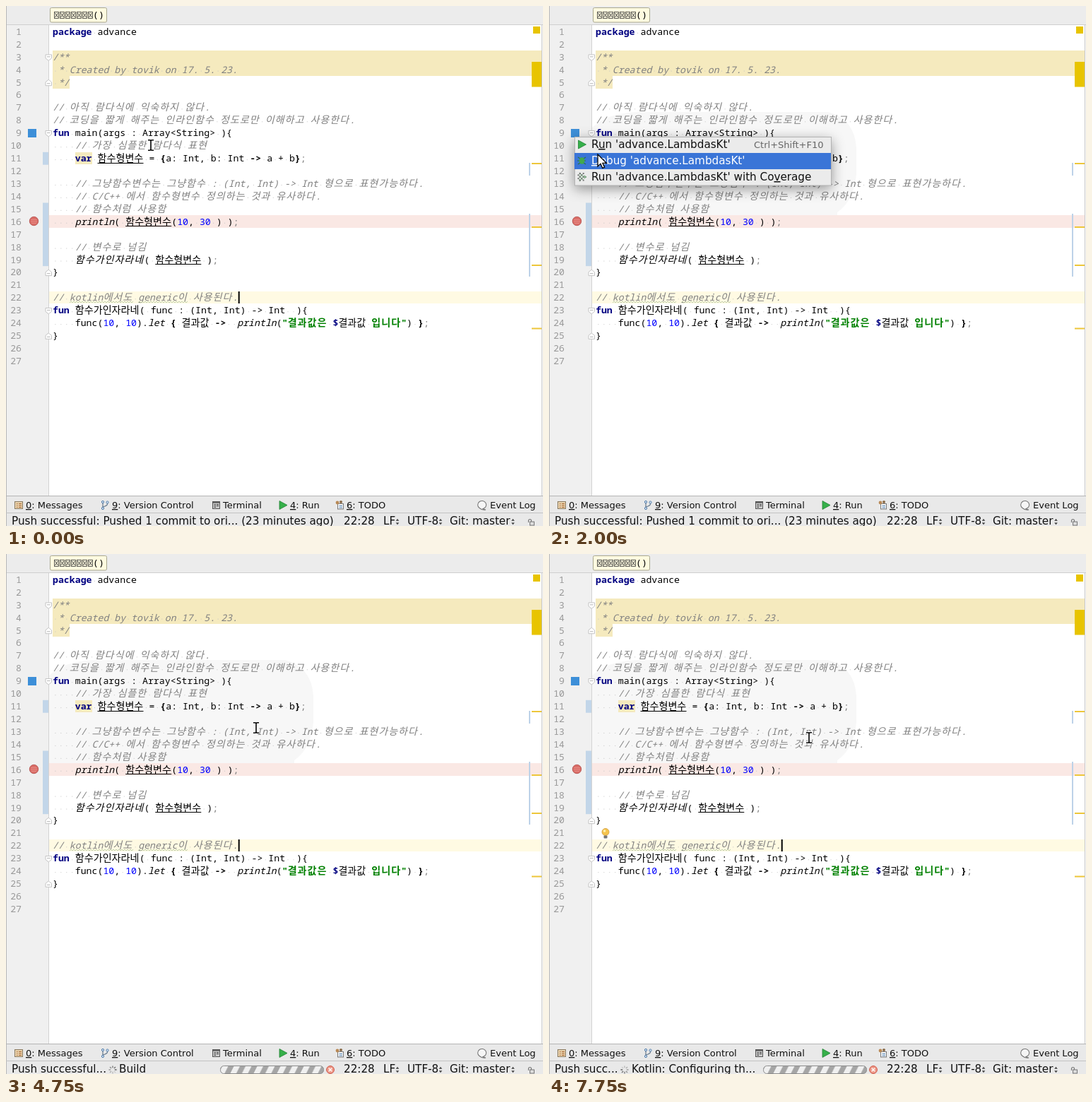
These frames come from a looping animation (760x736 px, 8 s). An HTML page:

```html
<!DOCTYPE html>
<html lang="ko">
<head>
<meta charset="utf-8">
<title>Editor</title>
<style>
html, body { margin: 0; width: 100%; height: 100%; overflow: hidden; background: #fff; }
svg { display: block; width: 760px; height: 736px; }
text { white-space: pre; }
.ui { font-family: "DejaVu Sans", sans-serif; font-size: 13px; fill: #111; }
.big { font-size: 15.2px; }
.mono { font-family: "Noto Sans Mono", monospace; font-size: 13.23px; fill: #000; }
.ko { font-family: "Noto Sans CJK KR", "Noto Sans CJK", sans-serif; font-size: 14.1px; }
.k, .b, .s { font-weight: bold; }
.k { fill: #000080; }
.s { fill: #008000; }
.n { fill: #0000ff; }
.c, .i { font-style: italic; }
.c, .g { fill: #808080; }
.ko.c, .ko.i, .ko.s { letter-spacing: .95px; }
.num { fill: #999; text-anchor: end; }
.key { text-decoration: underline; }
</style>
</head>
<body>
<svg id="stage" viewBox="0 0 760 736">
  <defs>
    <pattern id="stripes" width="16.5" height="12" patternUnits="userSpaceOnUse" y="724">
      <rect width="16.5" height="12" fill="#f0f0f0"/>
      <path d="M-10 12 L-4 0 H4 L-2 12Z M6.5 12 L12.5 0 H20.5 L14.5 12Z" fill="#a5a5a5"/>
    </pattern>
    <filter id="shadow" filterUnits="userSpaceOnUse" x="0" y="145" width="450" height="165">
      <feDropShadow dx="0" dy="5" stdDeviation="9" flood-opacity=".4"/>
    </filter>
  </defs>
</svg>
<script>
const NS = 'http://www.w3.org/2000/svg';
const stage = document.getElementById('stage');
const CELL = 7.938, ROW = 17.93, TOP = 27.5, LEFT = 66, RIGHT = 758;

function el(name, attrs = {}, parent = stage) {
  const node = document.createElementNS(NS, name);
  for (const a in attrs) node.setAttribute(a, attrs[a]);
  parent.appendChild(node);
  return node;
}
const group = (parent = stage) => el('g', {}, parent);
const rect = (x, y, width, height, fill, parent, more) =>
  el('rect', { x, y, width, height, fill, ...more }, parent);
const path = (d, fill, parent, more) => el('path', { d, fill, ...more }, parent);
const line = (d, stroke, width, parent) =>
  path(d, 'none', parent, { stroke, 'stroke-width': width });
const circle = (cx, cy, r, fill, parent, more) =>
  el('circle', { cx, cy, r, fill, ...more }, parent);
const rowTop = n => TOP + (n - 1) * ROW;
const baseline = n => rowTop(n) + 13.3;

// An underscore underlines the letter after it.
function label(x, y, str, cls, parent) {
  const node = el('text', { x, y, class: cls }, parent);
  const [head, tail] = str.split('_');
  node.append(head);
  if (tail) {
    el('tspan', { class: 'key' }, node).textContent = tail[0];
    node.append(tail.slice(1));
  }
  return node;
}

// Editor surfaces
rect(0, 0, 760, 736, '#fff');
rect(0, 0, 760, 26, '#ececec');
rect(0, 27, 60, 666, '#f0f0f0');
rect(0, 26, 760, 1, '#cfcfcf');
const halo = path('M61 172Q85 150 130 150H395Q432 160 435 200V238Q432 275 408 292V296H61Z', '#f7f7f7');
rect(LEFT, 63, RIGHT - LEFT, 36, '#f5eabe');
rect(LEFT, 99, 24, 18, '#f5eabe');
rect(98, 207, 24, 17, '#f5eabe');
rect(61, 296, RIGHT - 61, 18, '#fae8e4');
rect(61, 404, RIGHT - 61, 17, '#fffae3');
rect(60, 27, 1, 666, '#d3d3d3');
rect(0, 0, 1, 736, '#b8b8b8');
rect(RIGHT, 27, 1, 666, '#c4c4c4');

// Breadcrumb
rect(62.5, 2.5, 80, 20.5, '#fffbe0', stage, { stroke: '#a9a78f', rx: 2 });
for (let i = 0; i < 7; i++) {
  const x = 68.5 + i * 8;
  rect(x, 8.5, 6, 9, 'none', stage, { stroke: '#333', 'stroke-width': .8 });
  line(`M${x + 1} 10l4 6m0-6l-4 6`, '#444', 1);
}
label(123, 17, '()', 'mono');

// Change marks and stripe
for (const [a, b] of [[11, 12], [15, 20]])
  rect(52, rowTop(a), 8, rowTop(b) - rowTop(a), '#c2d6e9');
rect(740, 222, 2, 18, '#bdd2e8');
rect(740, 294, 2, 89, '#bdd2e8');
rect(746, 29, 10, 10, '#e8c400');
rect(744, 79, 14, 35.5, '#e8c400');
for (const y of [222, 312, 366, 455.5]) rect(744, y, 14, 2, '#edc63a');

// Code: style and text in turn
const code = [
  ['k', 'package', '', ' advance'],
  [],
  ['c', '/**'],
  ['c', ' * Created by tovik on 17. 5. 23.'],
  ['c', ' */'],
  [],
  ['c', '// 아직 람다식에 익숙하지 않다.'],
  ['c', '// 코딩을 짧게 해주는 인라인함수 정도로만 이해하고 사용한다.'],
  ['k', 'fun', '', ' main(args : Array<String> ){'],
  ['c', '    // 가장 심플한 람다식 표현'],
  ['k', '    var', '', ' ', 'u', '함수형변수', '', ' = ', 'b', '{', '', 'a: Int, b: Int ',
    'b', '->', '', ' a + b', 'b', '}', 'g', ';'],
  [],
  ['c', '    // 그냥함수변수는 그냥함수 : (Int, Int) -> Int 형으로 표현가능하다.'],
  ['c', '    // C/C++ 에서 함수형변수 정의하는 것과 유사하다.'],
  ['c', '    // 함수처럼 사용함'],
  ['i', '    println', '', '( ', 'u', '함수형변수', '', '(', 'n', '10', '', ', ', 'n', '30',
    '', ' ) )', 'g', ';'],
  [],
  ['c', '    // 변수로 넘김'],
  ['i', '    함수가인자라네', '', '( ', 'u', '함수형변수', '', ' )', 'g', ';'],
  ['', '}'],
  [],
  ['c', '// kotlin에서도 generic이 사용된다.'],
  ['k', 'fun', '', ' 함수가인자라네( func : (Int, Int) -> Int  ){'],
  ['', '    func(', 'n', '10', '', ', ', 'n', '10', '', ').', 'i', 'let', 'b', ' {', '', ' 결과값 ',
    'b', '->', 'i', '  println', '', '(', 's', '"결과값은 ', 'k', '$', '', '결과값', 's', ' 입니다"',
    '', ') ', 'b', '}', 'g', ';'],
  ['', '}'],
  [],
  []
];

function drawRun(x, y, style, str) {
  for (const part of str.match(/[가-힣]+|\s|[^가-힣\s]+/g)) {
    if (part === ' ') {
      rect(x + 3.4, y - 3, 1, 1, '#c4c4c4');
      x += CELL;
      continue;
    }
    const korean = /[가-힣]/.test(part);
    label(x, y, part, `mono ${korean ? 'ko ' : ''}${style}`);
    const width = part.length * (!korean ? CELL : 'cis'.includes(style || '-') ? 13.95 : 13);
    if (style === 'u') rect(x, Math.round(y + 1.5), width, 1, '#000');
    x += width;
  }
  return x;
}

code.forEach((runs, i) => {
  const y = baseline(i + 1);
  label(22, y, String(i + 1), 'mono num');
  let x = LEFT;
  for (let r = 0; r < runs.length; r += 2) x = drawRun(x, y, runs[r], runs[r + 1]);
});

function wave(from, to, y) {
  let d = `M${from} ${y}`;
  for (let x = from, up = true; x < to; x += 2, up = !up) d += `l2 ${up ? -2 : 2}`;
  line(d, '#b9c9a6', .9);
}
wave(90, 180, 420);
wave(187, 257, 420);

// Gutter marks
for (const [n, dir] of [[3, 1], [9, 1], [23, 1], [5, -1], [20, -1], [25, -1]]) {
  const y = rowTop(n) + 9.5;
  path(`M56 ${y - 4 * dir}h8.5v${5 * dir}l-4.25 ${3.5 * dir}l-4.25 ${-3.5 * dir}z`, '#fff', stage, { stroke: '#c4c4c4' });
  line(`M58 ${y - dir}h4.5`, '#b5b5b5', 1);
}
rect(31, 174, 12, 12, '#3d8fd8');
circle(39.5, 304.5, 6.2, '#db6e68', stage, { stroke: '#b4504c', 'stroke-width': .9 });
line('M35.5 302.5h8M35 305h9M36 307.5h7', '#e89a94', .7);

const bulb = group();
circle(80, 393.5, 5, '#f5c44e', bulb, { stroke: '#cf9836', 'stroke-width': .8 });
circle(78.6, 392, 1.8, '#fff0b0', bulb);
rect(77.5, 398.5, 5, 4, '#777', bulb, { rx: 1 });
const caret = rect(328.7, 404, 2, 17, '#000');

// Tool window bar
rect(1, 693, 759, 43, '#e9e9e9');
rect(0, 693, 760, 1, '#b5b5b5');
rect(0, 717, 760, 1, '#c2c2c2');
const messages = group(), tools = group();

const runIcon = (x, y, parent) =>
  path(`M${x} ${y}l11 6l-11 6z`, '#36b04a', parent, { stroke: '#238236', 'stroke-width': .8 });

rect(12.5, 701.5, 11, 10, '#e9d2ac', messages, { stroke: '#8a7a60' });
line('M15 704.5h1.5M18 704.5h4M15 707h1.5M18 707h4M15 709.5h1.5M18 709.5h4', '#a3602c', 1, messages);
label(28, 711, '_0: Messages', 'ui', messages);

line('M137 703v7M143.5 704v1q0 2-6 4', '#6d7f91', 1.3, tools);
for (const [x, y] of [[137, 702], [137, 711], [143.5, 702.5]])
  circle(x, y, 1.6, '#dfeaf5', tools, { stroke: '#4b78a8' });
label(150, 711, '_9: Version Control', 'ui', tools);

rect(292.5, 701.5, 10, 10, '#c9c9c9', tools, { stroke: '#555' });
rect(292, 701, 11, 2.5, '#555', tools);
line('M294.5 705.5h2.5M298 705.5h3M294.5 707.5h2.5M298 707.5h3M294.5 709.5h2.5', '#444', 1, tools);
label(307, 711, 'Terminal', 'ui', tools);

runIcon(387, 700.5, tools);
label(402, 711, '_4: Run', 'ui', tools);

rect(469.5, 704.5, 8, 7.5, '#f7f7f7', tools, { stroke: '#777' });
circle(469, 703, 2.4, '#b98a57', tools);
circle(474, 702, 2, '#8a6b48', tools);
line('M471.5 707.5h4.5M471.5 710h4.5', '#467bb0', 1, tools);
label(482, 711, '_6: TODO', 'ui', tools);

path('M670 710.5A6 5.6 0 1 1 675 711.5Q677 713 679 713Q674 714 670 710.5Z', '#f5f5f5', stage,
  { stroke: '#777', 'stroke-width': 1.1 });
label(685, 711, 'Event Log', 'ui');

// Status bar
const STATUS_Y = 734.4;
const status = label(8, STATUS_Y, 'Push', 'ui big');
const job = group();
const jobText = label(160, STATUS_Y, 'Build', 'ui big', job);
const spinner = group(job);
const spokes = Array.from({ length: 8 }, (_, i) => {
  const spoke = line('M0 -2.8V-5.6', '#555', 1.5, spinner);
  spoke.setAttribute('transform', `rotate(${i * 45})`);
  return spoke;
});
rect(303.5, 724.5, 146, 11, 'url(#stripes)', job, { rx: 5, stroke: '#8d8d8d' });
circle(459, 730, 5.4, '#ee9c8c', job, { stroke: '#cf5140' });
line('M456.8 727.8l4.4 4.4m0-4.4l-4.4 4.4', '#fff', 1.5, job);
label(478, STATUS_Y, '22:28', 'ui big');
for (const [x, str, arrow] of [[534, 'LF', 554], [568, 'UTF-8', 615], [628, 'Git: master', 717.5]]) {
  label(x, STATUS_Y, str, 'ui big');
  path(`M${arrow - 2.3} 728.8l2.3-3l2.3 3zM${arrow - 2.3} 731.2l2.3 3l2.3-3z`, '#444');
}
rect(741.5, 730, 6, 5, '#ddd', stage, { stroke: '#777' });
line('M739.5 731v-2.5q0-2 2-2t2 2v1.5', '#777', 1.2);

// Popup menu
const menu = group();
rect(36, 185, 364, 69, '#ebebeb', menu, { filter: 'url(#shadow)' });
rect(36.5, 185.5, 363, 68.5, '#ebebeb', menu, { stroke: '#b3b3b3' });
const bar = rect(36, 208, 363, 23, '#3a75d7', menu);
runIcon(41.5, 190, menu);
line('M41 214l3 2m8-2l-3 2M40 219h12M41 224l3-2m8 2l-3-2', '#2d7a38', 1.2, menu);
el('ellipse', { cx: 46.5, cy: 219, rx: 3.8, ry: 4.8, fill: '#41a94d' }, menu);
path('M43 236l10 6l-10 6z', '#9cc9a2', menu, { stroke: '#5b8a62', 'stroke-width': .8 });
for (let i = 0; i < 20; i++)
  rect(40.5 + i % 4 * 2.4, 236 + (i >> 2) * 2.4, 2, 2, i + (i >> 2) & 1 ? '#777' : '#eee', menu);
const items = ["R_un 'advance.LambdasKt'", "_Debug 'advance.LambdasKt'", "Run 'advance.LambdasKt' with Co_verage"]
  .map((str, i) => label(60, 201 + i * 23, str, 'ui big', menu));
const shortcut = label(290, 201, 'Ctrl+Shift+F10', 'ui', menu);

// Pointers
const arrow = path('M0 0V17L4 13.3L6.8 19.4L9.6 18.2L6.9 12.3H12.3Z', '#fff', stage,
  { stroke: '#000', 'stroke-width': 1.3 });
const beam = group();
for (const [color, width] of [['#fff', 3.4], ['#000', 1.6]])
  line('M-4 -7.3H-1.2L0 -6.3L1.2 -7.3H4M0 -6.3V6.3M-4 7.3H-1.2L0 6.3L1.2 7.3H4', color, width, beam);

// Timeline in steps of 250 ms
const STEP = 250, LOOP = 8000;
const moves = [
  [0, 205, 197], [1, 158, 182], [2, 92, 154], [3, 50, 160], [4, 37, 175], [5, 34, 183],
  [7, 50, 198], [8, 69, 210], [9, 74, 213], [10, 78, 214], [12, 150, 236], [13, 217, 253],
  [14, 262, 232], [15, 287, 190], [16, 291, 176], [17, 300, 182], [18, 327, 212],
  [19, 354, 246], [20, 368, 260]
];
const caretOn = [[0, 2], [4, 5], [12, 14], [16, 18], [19, 21], [23, 25], [27, 29], [31, 32]];
const statusTexts = [
  [0, 'Push successful: Pushed 1 commit to ori... (23 minutes ago)'],
  [15, 'Push successful...', 'Build', 160, 151],
  [24, 'Push succ...', 'Kotlin: Configuring th...', 117, 107]
];

const show = (node, on) => node.setAttribute('visibility', on ? 'visible' : 'hidden');
const at = (table, s) => table.filter(row => row[0] <= s).pop();
const within = (s, a, b) => s >= a && s < b;
const stripes = document.getElementById('stripes');

function draw(s) {
  const [, x, y] = at(moves, s);
  const pointing = within(s, 3, 12);
  for (const p of [arrow, beam]) p.setAttribute('transform', `translate(${x} ${y})`);
  show(arrow, pointing);
  show(beam, !pointing);
  show(caret, caretOn.some(([a, b]) => within(s, a, b)));
  show(halo, s >= 6);
  show(bulb, s >= 20);

  const open = within(s, 6, 12);
  const chosen = s < 7 ? -1 : s < 8 ? 0 : 1;
  show(menu, open);
  show(bar, open && chosen >= 0);
  bar.setAttribute('y', 185 + Math.max(chosen, 0) * 23);
  items.forEach((item, i) => item.style.fill = i === chosen ? '#fff' : '#111');
  shortcut.style.fill = chosen === 0 ? '#fff' : '#666';

  const cleared = within(s, 15, 19);
  show(messages, !cleared);
  tools.setAttribute('transform', `translate(${cleared ? -120.5 : 0} 0)`);

  const [, text, task, taskX, spinX] = at(statusTexts, s);
  status.textContent = text;
  show(job, task);
  if (task) {
    jobText.textContent = task;
    jobText.setAttribute('x', taskX);
    spinner.setAttribute('transform', `translate(${spinX} 730)`);
    spokes.forEach((spoke, i) => spoke.setAttribute('opacity', .2 + ((i - s + 32) % 8) * .1));
    stripes.setAttribute('x', s % 3 * 5.5);
  }
}

let last = -1;
const start = performance.now();
function tick(now) {
  const s = Math.floor(Math.max(0, now - start) % LOOP / STEP);
  if (s !== last) draw(last = s);
  requestAnimationFrame(tick);
}
draw(0);
requestAnimationFrame(tick);
</script>
</body>
</html>
```
